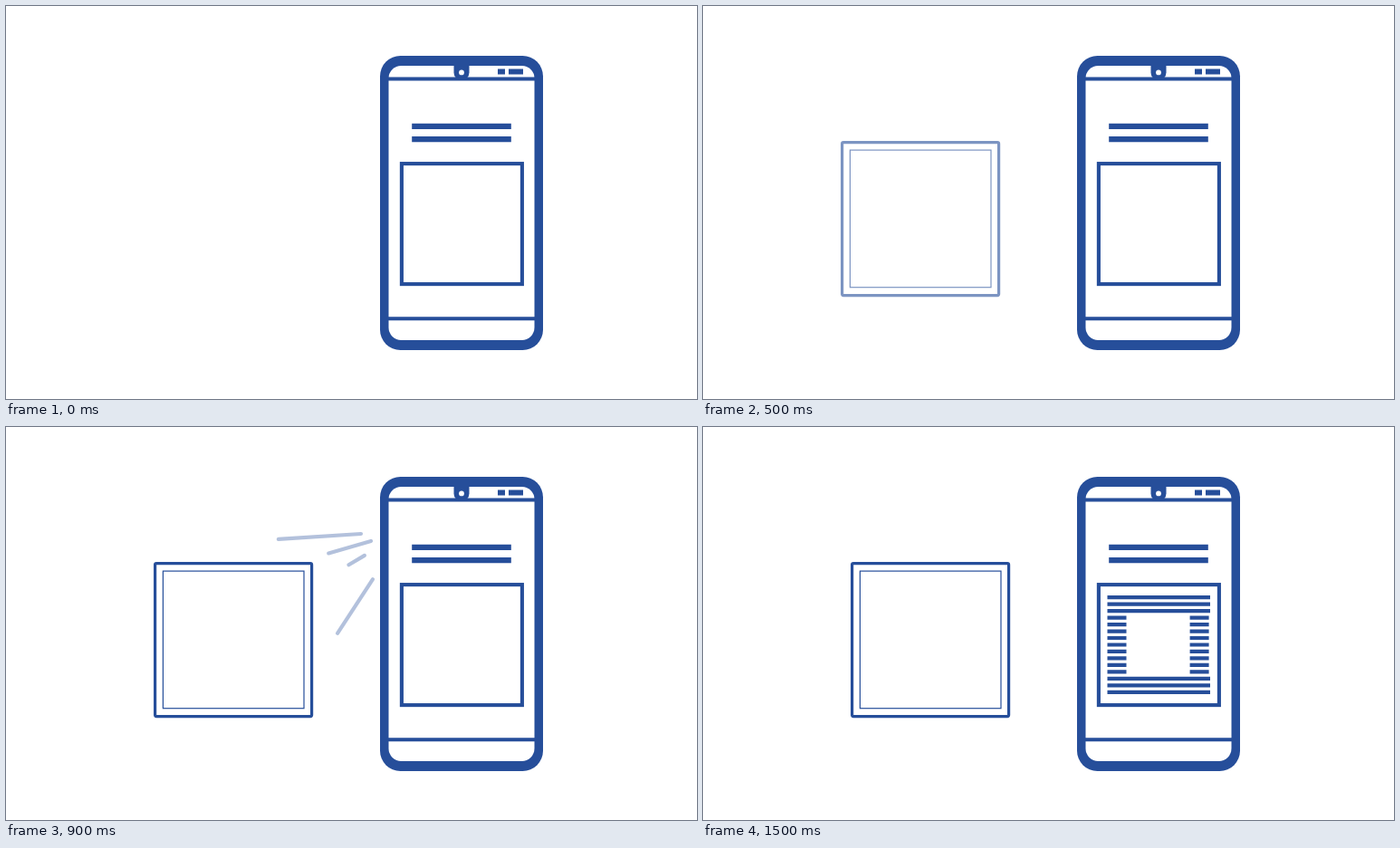
Animation of 763x434 px, one loop 3500 ms. Source, as an HTML page:

```html
<!DOCTYPE html>
<html lang="en">
<head>
<meta charset="utf-8">
<title>Scan a card with a phone</title>
<style>
  html, body { margin: 0; width: 100%; height: 100%; overflow: hidden; background: #fff; }
  svg { display: block; width: 763px; height: 434px; }
  .line { fill: none; stroke: #264e9a; }
  .ink { fill: #264e9a; }
  .paper { fill: #fff; }
</style>
</head>
<body>
<svg viewBox="0 0 763 434">
  <g id="card" class="line" opacity="0">
    <rect x="164.6" y="150.6" width="173" height="169" rx="1.5" stroke-width="3.2"/>
    <rect x="173.4" y="159.1" width="155.6" height="151.6" stroke-width="1.2"/>
  </g>

  <g id="rays" class="line" stroke-width="4.2" stroke-linecap="round" opacity="0">
    <path d="M300.8 123.9L392 118M356.2 139.4L403 125.9M378.4 152.3L395.9 141.9M366 227.8L405 168.2"/>
  </g>

  <g id="phone">
    <rect class="ink" x="413" y="55" width="180" height="325" rx="22.5"/>
    <rect class="paper" x="422.5" y="66" width="161" height="303" rx="14"/>
    <path class="line" stroke-width="4" d="M422 80.6H584M422 345.2H584"/>
    <path class="ink" d="M494.5 65H511.5V73.5a8.5 8.5 0 0 1-17 0Z"/>
    <circle class="paper" cx="503" cy="73.4" r="2.9"/>
    <path class="ink" d="M543 69.5h8v6h-8ZM555 69.5h16v6h-16Z"/>
    <path class="ink" d="M448.2 129.8h109.6v6.2H448.2ZM448.2 144h109.6v6.2H448.2Z"/>
    <rect class="line" x="436.9" y="174.1" width="133" height="133" stroke-width="4.1"/>
  </g>

  <path id="scan" class="line" stroke-width="4.2" opacity="0"/>
</svg>
<script>
  const LOOP = 3500, STEP = 100;
  const [card, rays, scan] = ["card", "rays", "scan"].map(id => document.getElementById(id));
  const clamp = v => Math.max(0, Math.min(1, v));

  // Stripes: full rows above and below, split rows in the middle.
  let d = "";
  for (let i = 0; i < 15; i++) {
    const y = (188.2 + i * 7.47).toFixed(2);
    d += i < 3 || i > 11 ? `M446.5 ${y}H560` : `M446.5 ${y}H467.5M537.6 ${y}H558.6`;
  }
  scan.setAttribute("d", d);

  const slide = [-46, -37, -28, -20, -11, -3];

  function pose(t) {
    const n = Math.floor(t / STEP);
    const moving = n >= 1 && n <= 6;
    const x = moving ? slide[n - 1] : 0;
    const fade = moving ? (n - 0.5) / 7.5 : n > 6 ? 1 : 0;
    card.setAttribute("transform", `translate(${x} 0)`);
    card.setAttribute("opacity", fade);
    rays.setAttribute("opacity", n >= 8 && n <= 12 ? 0.15 + (n - 8) * 0.2 : 0);
    scan.setAttribute("opacity", clamp((n - 11) / 4));
  }

  let start;
  function tick(now) {
    start ??= now;
    pose((now - start) % LOOP);
    requestAnimationFrame(tick);
  }
  pose(0);
  requestAnimationFrame(tick);
</script>
</body>
</html>
```
